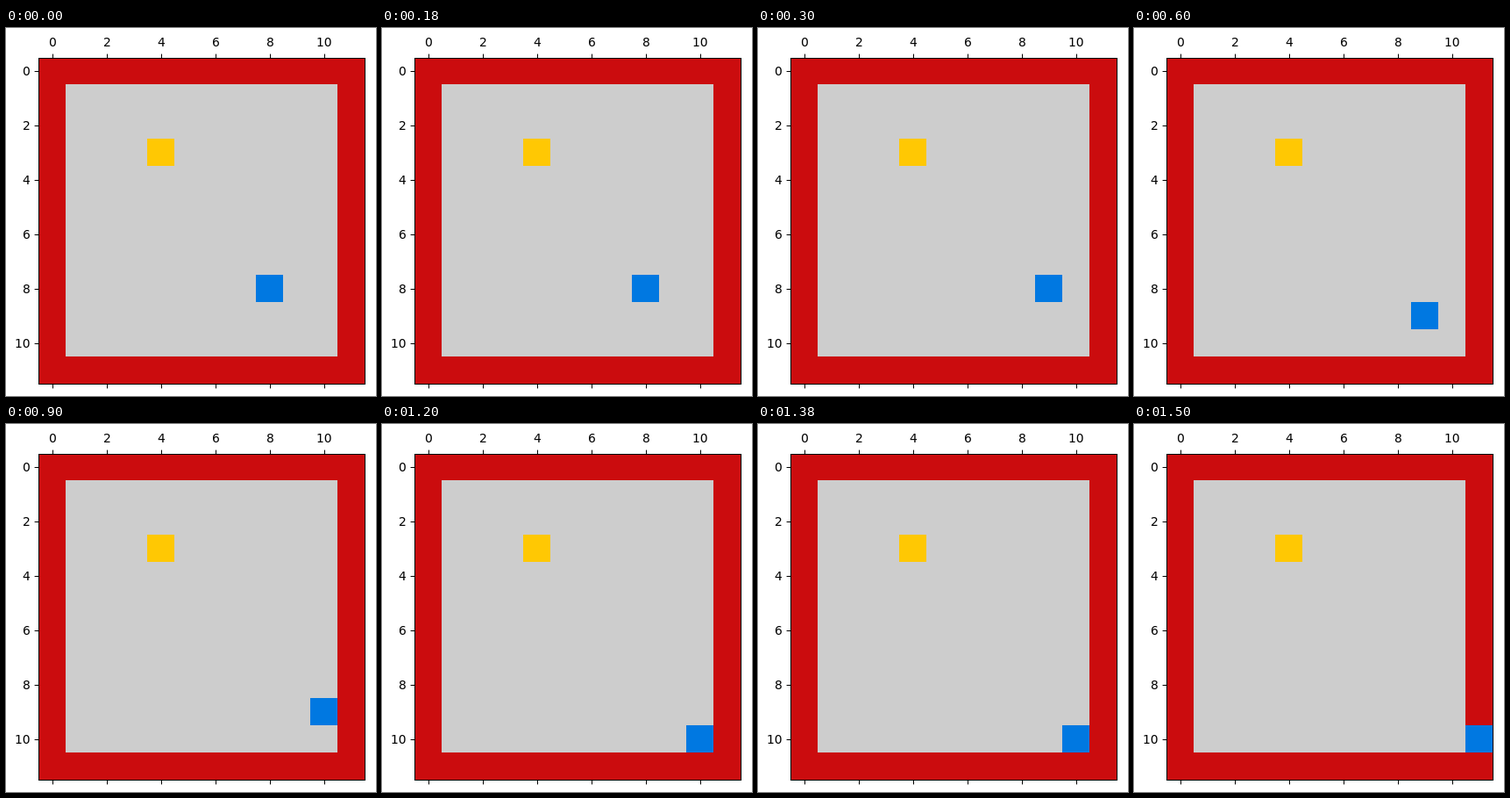
Recreate the animation shown at these times as an HTML page. Size 422x419 px, loop 1800 ms.

```html
<!DOCTYPE html>
<html lang="en">
<head>
<meta charset="utf-8">
<title>Grid walk</title>
<style>
  html, body { margin: 0; width: 100%; height: 100%; overflow: hidden; background: #fff; }
  svg { display: block; }
  text { font: 13.89px "DejaVu Sans", sans-serif; fill: #000; }
</style>
</head>
<body>
<svg id="stage" width="422" height="419" viewBox="0 0 422 419"></svg>
<script>
const CELL = 31, LEFT = 37, TOP = 33, SIZE = 12 * CELL;
const STEP_MS = 300;
const path = [[8, 8], [9, 8], [9, 9], [10, 9], [10, 10], [11, 10]];
const stage = document.getElementById("stage");

function add(tag, attrs, text = "") {
  const el = document.createElementNS("http://www.w3.org/2000/svg", tag);
  for (const key in attrs) el.setAttribute(key, attrs[key]);
  el.textContent = text;
  stage.append(el);
  return el;
}

const rect = (x, y, width, height, fill) => add("rect", { x, y, width, height, fill });
const cells = (col, row, count, fill) =>
  rect(LEFT + col * CELL, TOP + row * CELL, count * CELL, count * CELL, fill);

// Board
rect(LEFT, TOP + 1, SIZE, SIZE - 1, "#cb0c0e");
cells(1, 1, 10, "#cdcdcd");
cells(4, 3, 1, "#ffc803");
const walker = cells(0, 0, 1, "#0078e1");

// Axes frame
add("rect", {
  x: LEFT + 0.5, y: TOP + 1.5, width: SIZE, height: SIZE - 1,
  fill: "none", stroke: "#000", "stroke-width": 1
});

// Ticks and labels
for (let n = 0; n <= 10; n += 2) {
  const x = LEFT + 16 + n * CELL, y = TOP + 16 + n * CELL;
  const wide = n > 9;
  rect(x, 29.6, 1, 4.9, "#000");
  rect(x, 405.5, 1, 4.9, "#000");
  rect(32.6, y, 4.9, 1, "#000");
  add("text", { x: x - (wide ? 9 : 4), y: 21 }, n);
  add("text", { x: wide ? 10 : 19, y: y + 5 }, n);
}

// Hard jumps from cell to cell
const poses = [...path, path[path.length - 1]].map(([col, row], i) => ({
  offset: i / path.length,
  transform: `translate(${col * CELL}px, ${row * CELL}px)`,
  easing: "steps(1, end)"
}));
walker.animate(poses, { duration: STEP_MS * path.length, iterations: Infinity });
</script>
</body>
</html>
```
